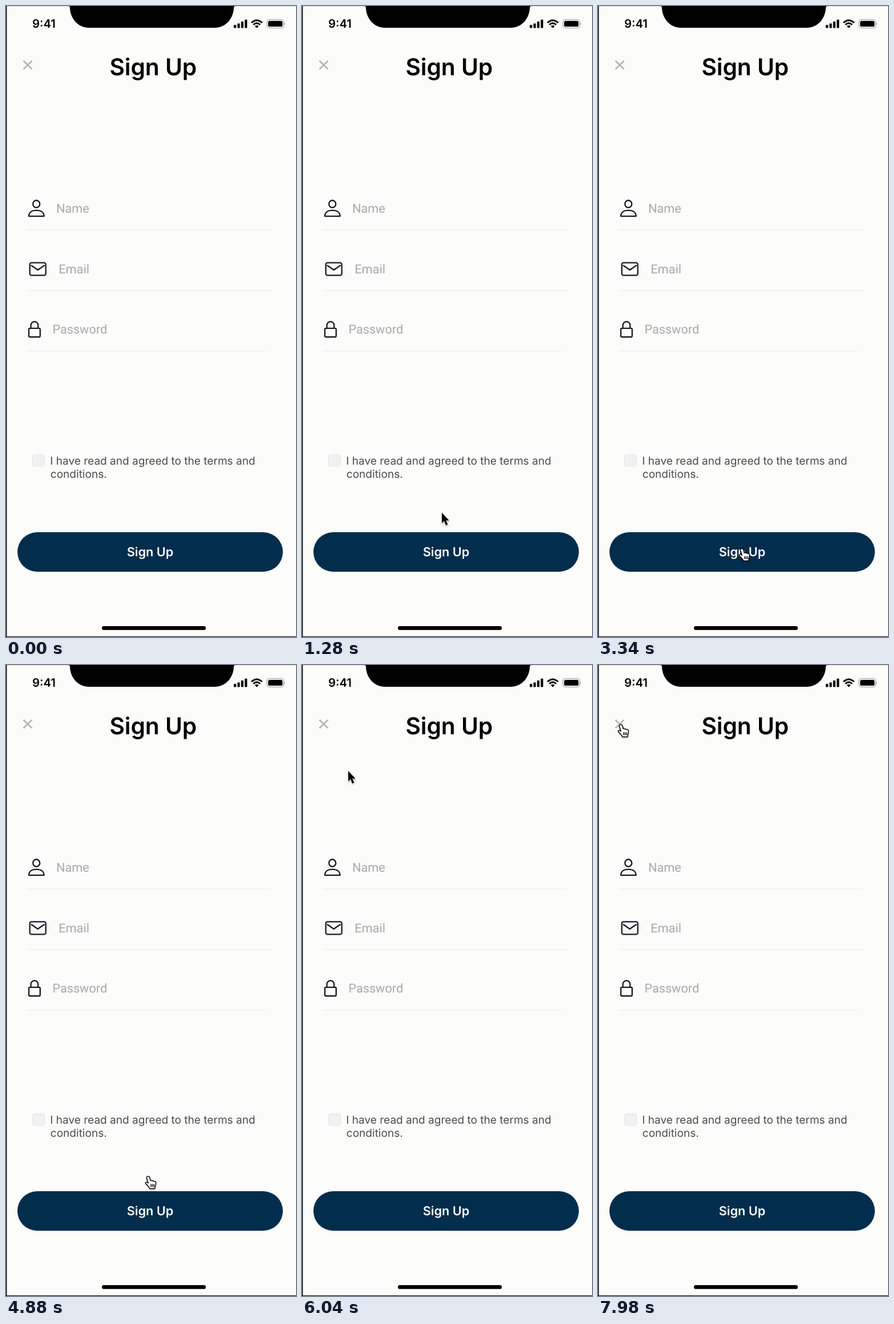
Animation of 508 by 1102 pixels, one loop 8000 ms. Source, as an HTML page:

```html
<!DOCTYPE html>
<html lang="en">
<head>
<meta charset="utf-8">
<title>Sign Up</title>
<style>
  html, body { margin: 0; width: 100%; height: 100%; overflow: hidden; background: #fcfcfb; }
  svg { display: block; width: 508px; height: 1102px; }
  text { font-family: Inter, sans-serif; text-rendering: geometricPrecision; }
  .label { font: 21.68px Roboto, sans-serif; fill: #a9a9ab; }
  .terms { font-size: 19.06px; fill: #4b4b4d; }
  .strong { font-weight: 600; text-anchor: middle; }
  .icon { fill: none; stroke: #191823; stroke-width: 2.3; stroke-linecap: round; stroke-linejoin: round; }
  .rule { stroke: #efefef; stroke-width: 1.4; }
  #cursor { filter: drop-shadow(0 1.5px 1.2px rgba(0, 0, 0, .35)); }
</style>
</head>
<body>
<svg viewBox="0 0 508 1102">
  <rect width="508" height="1102" fill="#fcfcfb"/>
  <path d="M0 .5H508" stroke="#d8d8d8"/>
  <path d="M.7 0V1102" stroke="#000" stroke-width="1.4"/>
  <path d="M0 1101.5H508" stroke="#000"/>

  <!-- status bar -->
  <path d="M109 0Q112 0 112 4C113 23 127 38 145 38H366C384 38 398 23 399 4Q399 0 402 0Z"/>
  <text class="strong" x="66.5" y="38" font-size="20.3">9:41</text>
  <g>
    <rect x="399" y="33" width="4.2" height="5.5" rx="1"/>
    <rect x="405.4" y="30.5" width="4.2" height="8" rx="1"/>
    <rect x="411.8" y="27" width="4.2" height="11.5" rx="1"/>
    <rect x="418.2" y="23.8" width="4.2" height="14.7" rx="1"/>
  </g>
  <g fill="none" stroke="#000" stroke-width="2.9">
    <path d="M430 29.2Q439.3 20.6 448.6 29.2"/>
    <path d="M433.4 32.8Q439.3 27.4 445.2 32.8"/>
  </g>
  <path d="M436 35.2Q439.3 32.4 442.6 35.2L439.3 38.7Z"/>
  <rect x="457" y="23.7" width="29.6" height="14.6" rx="4.6" fill="none" stroke="#a4a4a4" stroke-width="1.3"/>
  <rect x="459.2" y="25.9" width="25.2" height="10.2" rx="2.6"/>
  <path d="M488 28.5Q490.2 31 488 33.5Z" fill="#a4a4a4"/>

  <!-- header -->
  <path d="M30.5 95.8L45.5 110.2M45.5 95.8L30.5 110.2" stroke="#b4b4b4" stroke-width="2.6"/>
  <text class="strong" x="257.8" y="121" font-size="40.64">Sign Up</text>

  <!-- form fields -->
  <g class="icon">
    <ellipse cx="53.2" cy="345.8" rx="6" ry="6.3"/>
    <path d="M40 367.2C40 360.3 45.5 356.8 53.3 356.8S66.6 360.3 66.6 367.2Z"/>
    <rect x="41.7" y="448.4" width="28" height="22" rx="3"/>
    <path d="M44.5 453.3L55.7 461L66.9 453.3"/>
    <rect x="40" y="562.8" width="19.8" height="15.2" rx="2"/>
    <path d="M43.6 562.5V557.5A6.3 6.3 0 0 1 56.2 557.5V562.5"/>
  </g>
  <text class="label" x="88" y="360.8">Name</text>
  <text class="label" x="92.3" y="466.5">Email</text>
  <text class="label" x="81.4" y="572.4">Password</text>
  <path class="rule" d="M38 391.2H462M38 497H467M38 602.8H455"/>

  <!-- terms and button -->
  <rect x="46.5" y="783.5" width="21" height="20.6" rx="4.2" fill="#f1f1f1" stroke="#e3e3e3"/>
  <text class="terms" x="77.3" y="801">I have read and agreed to the terms and</text>
  <text class="terms" x="77.8" y="824">conditions.</text>
  <rect x="20" y="919" width="465" height="69" rx="34.5" fill="#022d4d"/>
  <text class="strong" x="252.5" y="961" font-size="21.68" fill="#fff">Sign Up</text>
  <rect x="168" y="1083" width="182" height="6.8" rx="3.4"/>

  <!-- pointer shapes, hot spot at 0,0 -->
  <g id="cursor">
    <path id="arrow" d="M0 0V18.2L4 14.6L7.2 22L10.4 20.6L7.3 13.4H12.6Z"
          stroke="#fff" stroke-width="1.5" paint-order="stroke"/>
    <g id="hand" transform="translate(-4.5 -1.5)" stroke="#000" stroke-width="1.4"
       stroke-linejoin="round" stroke-linecap="round">
      <path fill="#fff" d="M4.5 1.2C6.3 .4 7.8 1.8 8.3 3.6L9.6 8.6C10.6 8 12 8.2 12.6 9.2C13.8 8.5 15.2 9 15.8 10C17.4 9.4 18.8 10.4 19 12.2C19.2 15 18.3 17 17.6 19L17.3 22.5H8.5C8 20.5 5.5 18.5 4 16.5C2.5 14.8 1 13.8 .8 12.6C.8 11 2.8 10.6 4.2 11.8L5.6 13L3 4C2.6 2.6 3.2 1.6 4.5 1.2Z"/>
      <path d="M10.4 15V19M13 15V19M15.6 15V19"/>
    </g>
  </g>
</svg>
<script>
const LOOP = 8000, HOVER_LAG = 150;
const [cursor, arrow, hand] = ['cursor', 'arrow', 'hand'].map(id => document.getElementById(id));

// Pointer route: time in ms, x, y
const route = [
  [650, 270, 1104], [1150, 245, 885], [1750, 245, 885], [2150, 250.5, 947.5],
  [3000, 250.5, 947.5], [3300, 251, 948], [4700, 251, 948], [4880, 248, 893.5],
  [5720, 81, 185], [6200, 81, 185], [6700, 39, 104.5], [8000, 39, 104.5]
];

function pointerAt(time) {
  if (time <= route[0][0]) return route[0].slice(1);
  const i = route.findIndex(stop => stop[0] >= time);
  const [t0, x0, y0] = route[i - 1], [t1, x1, y1] = route[i];
  const u = (time - t0) / (t1 - t0), ease = u * u * (3 - 2 * u);
  return [x0 + (x1 - x0) * ease, y0 + (y1 - y0) * ease];
}

function isClickable([x, y]) {
  const onButton = x > 20 && x < 485 && y > 919 && y < 988;
  const onClose = x > 28 && x < 48 && y > 93 && y < 113;
  return onButton || onClose;
}

const start = performance.now();

function draw() {
  const time = (performance.now() - start) % LOOP;
  const [x, y] = pointerAt(time);
  const hovering = isClickable(pointerAt(time - HOVER_LAG));
  cursor.style.display = time < route[0][0] ? 'none' : '';
  cursor.setAttribute('transform', `translate(${x} ${y})`);
  arrow.style.display = hovering ? 'none' : '';
  hand.style.display = hovering ? '' : 'none';
  requestAnimationFrame(draw);
}
draw();
</script>
</body>
</html>
```
